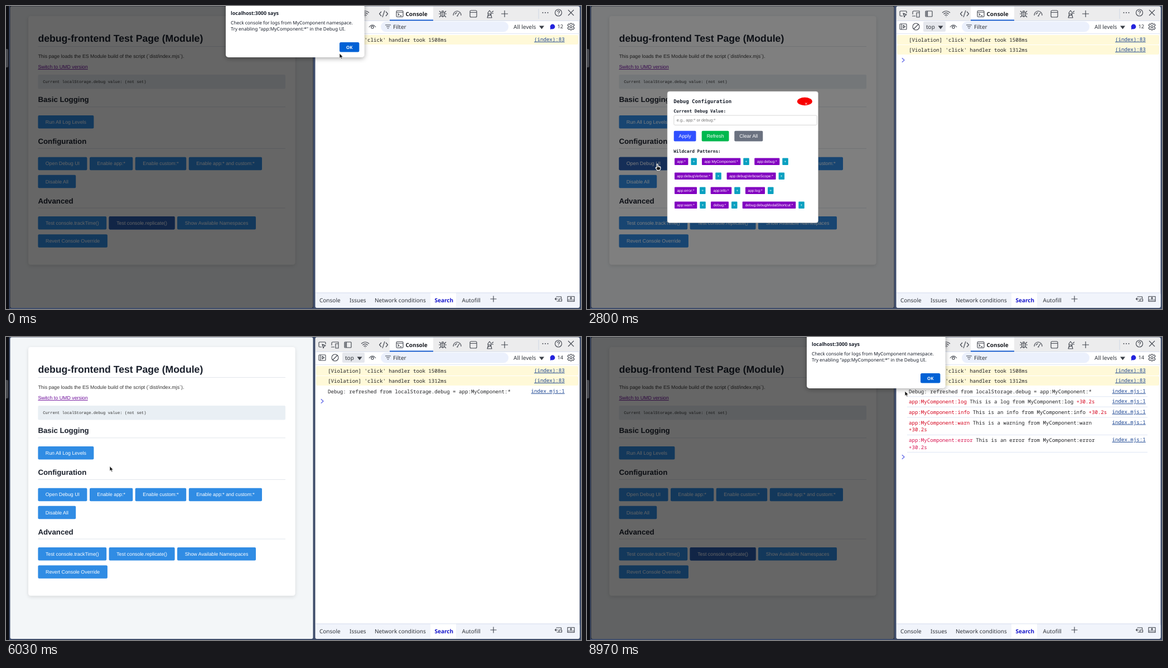
These frames come from a looping animation (1031x543 px, 9010 ms). An HTML page:

```html
<!DOCTYPE html>
<html lang="en">
<head>
<meta charset="utf-8">
<title>Debug console demo</title>
<style>
html, body { margin: 0; width: 100%; height: 100%; overflow: hidden; background: #3f4d6b; }
svg { display: block; width: 1031px; height: 543px; }
text { white-space: pre; text-rendering: geometricPrecision; }
.sans { font-family: "Liberation Sans", Arial, sans-serif; }
.ui { font-family: "Noto Sans", "Open Sans", sans-serif; }
.log { font-family: "Noto Sans Mono", monospace; }
.mono { font-family: "Liberation Mono", monospace; }
.dmono { font-family: "DejaVu Sans Mono", monospace; }
.b { font-weight: bold; }
.semi { font-weight: 600; }
.mid { text-anchor: middle; }
.end { text-anchor: end; }
.link { text-decoration: underline; }
.icon { fill: none; stroke: #434750; stroke-width: 1.15; stroke-linejoin: round; }
</style>
</head>
<body>
<svg id="stage" viewBox="0 0 1031 543" xmlns="http://www.w3.org/2000/svg"></svg>
<script>
const LOOP = 9010;
const INK = '#1a202c', BLUE = '#308ce4', DARK = '#2a5caf';

const rect = (x, y, w, h, fill, r = 0, attrs = '') =>
  `<rect x="${x}" y="${y}" width="${w}" height="${h}" rx="${r}" fill="${fill}" ${attrs}/>`;
const text = (x, y, s, size, cls, fill = INK) =>
  `<text x="${x}" y="${y}" font-size="${size}" class="${cls}" fill="${fill}">${s}</text>`;
const group = (id, body) => `<g id="${id}">${body}</g>`;
const icon = (x, y, d) => `<path class="icon" transform="translate(${x} ${y})" d="${d}"/>`;
const triangle = (x, y) => `<path d="M${x} ${y}h9l-4.5 6z" fill="#3c4048"/>`;

// Web page

function pageButton(x, y, w, label, hoverId) {
  return rect(x, y, w, 23.5, BLUE, 2) +
    (hoverId ? rect(x, y, w, 23.5, DARK, 2, `id="${hoverId}"`) : '') +
    text(x + w / 2, y + 14.7, label, 8.83, 'sans mid', '#fff');
}

const heading = (y, s) => text(57.4, y, s, 13.25, 'sans b') + rect(57.4, y + 8, 443.6, 1, '#e2e6ec');

const page = rect(7.5, .5, 543, 540.5, '#f3f6f8', 3) +
  rect(40, 18, 478.5, 445.5, '#fff', 4.5, 'filter="url(#soft)"') +
  text(57.4, 64, 'debug-frontend Test Page (Module)', 17.66, 'sans b') +
  rect(57.4, 72, 443.6, 1, '#e2e6ec') +
  text(57.4, 93, 'This page loads the ES Module build of the script (`dist/index.mjs`).', 8.83, 'sans', '#333') +
  text(57.4, 112, 'Switch to UMD version', 8.83, 'sans link', '#6c0a9a') +
  rect(57.4, 123, 443.6, 25.5, '#e9eff4', 2) +
  text(66.2, 138.4, 'Current localStorage.debug value: (not set)', 7.2, 'mono', '#333') +
  heading(172.3, 'Basic Logging') +
  pageButton(57.4, 196, 100, 'Run All Log Levels') +
  heading(247, 'Configuration') +
  pageButton(57.4, 270.7, 88, 'Open Debug UI', 'openHover') +
  pageButton(150, 270.7, 77.3, 'Enable app:*') +
  pageButton(231.7, 270.7, 91.5, 'Enable custom:*') +
  pageButton(327.8, 270.7, 131.2, 'Enable app:* and custom:*') +
  pageButton(57.4, 302.8, 67.8, 'Disable All') +
  heading(353.5, 'Advanced') +
  pageButton(57.4, 377, 122.8, 'Test console.trackTime()') +
  pageButton(184.6, 377, 118, 'Test console.replicate()', 'replicateHover') +
  pageButton(307, 377, 141, 'Show Available Namespaces') +
  pageButton(57.4, 409.2, 124.5, 'Revert Console Override');

// Debug modal

const chips = [
  [157, 24.4, 'app:*'], [206, 69.3, 'app:MyComponent:*'], [300.3, 45, 'app:debug:*'],
  [157, 68.3, 'app:debugVerbose:*'], [250.6, 88, 'app:debugVerboseScope:*'],
  [157, 40, 'app:error:*'], [221.7, 37.5, 'app:info:*'], [284, 35, 'app:log:*'],
  [157, 40.3, 'app:warn:*'], [222, 32, 'debug:*'], [278.7, 95.6, 'debug:debugModalShortcut:*']
];

function drawChips() {
  let y = 246.5;
  return chips.map(([x, w, label]) => {
    if (x === 157) y += 26;
    return rect(x, y, w, 12.6, '#8200c0', 1) +
      text(x + w / 2, y + 8.7, label, 6.62, 'sans mid', '#fff') +
      rect(x + w + 5, y, 10.5, 12.6, '#08a0c0', 1) +
      text(x + w + 10.2, y + 8.5, '+', 6.62, 'sans mid', '#fff');
  }).join('');
}

const modalButton = (x, w, label, fill) =>
  rect(x, 223.7, w, 18.8, fill, 2) + text(x + w / 2, 236.2, label, 8.83, 'sans mid', '#fff');

const modal = rect(144, 153, 270.5, 235.5, '#fff', 4, 'stroke="#bbb" stroke-width=".6"') +
  text(155.3, 173.7, 'Debug Configuration', 9.09, 'dmono b') +
  '<ellipse cx="390.4" cy="171" rx="13.5" ry="7.2" fill="#f80000"/>' +
  text(392.8, 178.3, '×', 8.8, 'sans mid', '#fff') +
  text(155.3, 191.2, 'Current Debug Value:', 7.8, 'dmono b') +
  rect(155.8, 196, 256.4, 17.4, '#fff', 2, 'stroke="#ccc" stroke-width=".8"') +
  group('placeholder', text(160.8, 207.4, 'e.g., app:* or debug:*', 7.36, 'sans', '#757575')) +
  group('value', text(160.8, 207.4, 'app:MyComponent:*', 7.36, 'sans', '#111')) +
  modalButton(155.7, 39.8, 'Apply', '#3050ff') +
  modalButton(205.7, 48.8, 'Refresh', '#00b84e') +
  modalButton(264.3, 51, 'Clear All', '#6b7280') +
  text(155.3, 262.8, 'Wildcard Patterns:', 7.8, 'dmono b') +
  drawChips();

// Developer tools

const LOG = 9.12, LINK = '#174291';
const logText = (x, y, s, fill = '#202124') => text(x, y, s, LOG, 'log', fill);
const logLink = (y, s) => text(1001.7, y, s, LOG, 'log end link', LINK);
const violation = (y, ms) => rect(556, y - 12, 470, 17, '#fff9d8', 3) +
  logText(577, y, `[Violation] 'click' handler took ${ms}ms`) + logLink(y - 1, '(index):83');

function replicateLog(y, level, message, color, wraps) {
  const time = `<tspan fill="${color}"${wraps ? ' x="577" dy="12.7"' : ''}>${wraps ? '' : ' '}+30.2s</tspan>`;
  return rect(574, y - 13, 431, 1, '#dfe6f5') +
    logText(577, y, `<tspan fill="${color}">app:MyComponent:${level}</tspan> This is ${message} from MyComponent:${level}${time}`) +
    logLink(y - 1, 'index.mjs:1');
}

const toolIcons = [
  [567, 14, 'M-1 4H-4.5Q-6 4-6 2.5V-4Q-6-5-4.5-5H4.5Q6-5 6-4V-1M0-1L6 1.6 3.4 2.8 2 6Z'],
  [590, 14, 'M-6 1V-3Q-6-5-4-5H6V-2M-7 4H-1M1-2H6V6H1Z'],
  [613, 14, 'M-5-5H5Q6-5 6-4V4Q6 5 5 5H-5Q-6 5-6 4V-4Q-6-5-5-5M-2.5-5V5M-4.3-4V4'],
  [644, 14, 'M-7-2Q0-8 7-2M-4.7.6Q0-4 4.7.6M-2.4 3Q0 .8 2.4 3M-.5 5H.5'],
  [677, 14, 'M-4-4L-7.5 0-4 4M4-4L7.5 0 4 4M2-6L-2 6'],
  [706, 14, 'M-4.5-5.5H4.5Q6-5.5 6-4V4Q6 5.5 4.5 5.5H-4.5Q-6 5.5-6 4V-4Q-6-5.5-4.5-5.5M-6-2.8H6M-3.5-.8L-1.2 1.2-3.5 3.2M0 3.4H3.4'],
  [783, 14, 'M-3-2Q0-5 3-2V3Q0 8 -3 3ZM-2-4Q0-7 2-4M-3 0H-7M3 0H7M-3-2L-6-5M3-2L6-5M-3 3L-6 6M3 3L6 6M0-3V5'],
  [809, 14, 'M-7 3Q-7-4 0-5 7-4 7 3M-4 1Q-3-2 0-2M0 4L4-2M-1 4H1.5'],
  [838, 14, 'M-4-6H4Q6-6 6-4V4Q6 6 4 6H-4Q-6 6-6 4V-4Q-6-6-4-6M-6-2.5H6'],
  [867, 14, 'M-3-2L0-6 3-2V0H-3ZM-2 0L-4 7H4L2 0M-3 4L3 1M4-3L7-5M4-1H7'],
  [894, 14, 'M-6 0H6M0-6V6'],
  [990.5, 12, 'M6 0A6 6 0 1 0-6 0 6 6 0 1 0 6 0M-2-1.5Q-1.5-3.5 0-3.5 2-3.5 2-1.5 1.5-.5 0 1M0 2.5V3.6'],
  [1013, 12, 'M-5-5L5 5M5-5L-5 5'],
  [567, 37, 'M-5-5H5Q6-5 6-4V4Q6 5 5 5H-5Q-6 5-6 4V-4Q-6-5-5-5M-3-5V5M0-2.5L3.5 0 0 2.5Z'],
  [590, 37, 'M6 0A6 6 0 1 0-6 0 6 6 0 1 0 6 0M4-4L-4 4'],
  [657, 37, 'M-6 1Q0-7 6 1M2.2 1A2.2 2.2 0 1 0-2.2 1 2.2 2.2 0 1 0 2.2 1'],
  [685, 37, 'M-5-3H5M-3 0H3M-1.3 3H1.3'],
  [1013, 37, 'M2 0A2 2 0 1 0-2 0 2 2 0 1 0 2 0M-1-6H1L2-4 4.5-5 6-2.5 4.5-1V1L6 2.5 4.5 5 2 4 1 6H-1L-2 4-4.5 5-6 2.5-4.5 1V-1L-6-2.5-4.5-5-2-4Z'],
  [874, 525, 'M-5.5 0H5.5M0-5.5V5.5'],
  [990.5, 525, 'M-4-4H5V-1M1 4H-3M-6 0H-1M-4-2L-6 0-4 2M1 0H6V4H1Z'],
  [1013, 525, 'M-6-4.5H6V4.5H-6ZM-6 2H6M0 1V-2.5M-2-.8L0-2.8 2-.8']
];

const uiText = (x, y, s, cls = '', fill = '#30343b') => text(x, y, s, 10, 'ui ' + cls, fill);

const devtools = rect(554.5, .5, 474, 540.5, '#fff', 3) +
  rect(555, 1, 473.5, 25, '#ececed', 3) + rect(555, 26, 473.5, 1, '#d8e0f0') +
  rect(688, 1, 78, 25, '#fff') + rect(688, 24.5, 78, 2, '#1a5fd0') +
  uiText(716.5, 17.7, 'Console', 'semi', '#16191f') +
  rect(954.5, 5, 1, 18, '#cdd6e6') +
  [962.5, 967, 971.5].map(x => `<circle cx="${x}" cy="12" r="1" fill="#434750"/>`).join('') +
  rect(603, 28, 40, 18, '#e5e7ec', 2) + uiText(608, 41, 'top') + triangle(629.5, 35.5) +
  rect(672, 28, 229, 18.5, '#ebf0fc', 9) + uiText(694, 41, 'Filter') +
  uiText(910, 41, 'All levels') + triangle(956, 35.5) +
  '<circle cx="980" cy="37" r="4.4" fill="#2323dc"/><path d="M976 37v5l3-1z" fill="#2323dc"/>' +
  `<text id="count" x="988.5" y="40" font-size="9.3" class="ui" fill="#30343b"></text>` +
  rect(555, 49, 473.5, 1, '#dfe6f3') +
  violation(64, 1508) +
  group('second', violation(82, 1312)) +
  group('refreshed', logText(577, 100.8, 'Debug: refreshed from localStorage.debug = app:MyComponent:*') + logLink(100, 'index.mjs:1')) +
  group('logs',
    replicateLog(119.3, 'log', 'a log', '#d4001c') +
    replicateLog(137.8, 'info', 'an info', '#d4001c') +
    replicateLog(156.6, 'warn', 'a warning', '#d4001c', true) +
    replicateLog(188, 'error', 'an error', '#d8134f', true) +
    rect(574, 206, 431, 1, '#dfe6f5')) +
  '<path id="prompt" d="M564.8-3.8L569 0l-4.2 3.8" fill="none" stroke="#5a62e6" stroke-width="1.2"/>' +
  rect(555, 514, 473.5, 26.5, '#f1f4fb', 3) + rect(555, 513.5, 473.5, 1, '#d3dcee') +
  rect(761, 514.5, 46, 26, '#fff') +
  uiText(562, 531, 'Console') + uiText(616, 531, 'Issues') + uiText(661, 531, 'Network conditions') +
  uiText(768.5, 531, 'Search', 'semi', '#1414cc') + uiText(817.5, 531, 'Autofill') +
  toolIcons.map(i => icon(...i)).join('');

const alertBox = rect(394, -8, 248.5, 100, '#fff', 5, 'filter="url(#lift)"') +
  text(403, 16, 'localhost:3000 says', 9, 'ui b') +
  text(403, 32.8, 'Check console for logs from MyComponent namespace.', 8.35, 'ui') +
  text(403, 43.5, 'Try enabling "app:MyComponent:*" in the Debug UI.', 8.35, 'ui') +
  rect(598, 65, 35.4, 17.6, '#0061d5', 2.5, 'id="ok"') +
  text(615.7, 76.6, 'OK', 7.8, 'ui b mid', '#fff');

const cursors = group('arrow', '<path d="M0 0V8.6L2 6.8 3.5 10 5 9.3 3.6 6.3H6.3Z" fill="#111" stroke="#fff" stroke-width=".7"/>') +
  group('hand', '<path d="M-1 .8Q0-.6 1 .8V4Q2.3 3.4 2.8 4.5 4 4 4.4 5 5.8 4.7 5.8 6.2V8.5Q5.5 11 3.5 11.3H0Q-1 10.5-3 7.2-2.7 5.6-1 7Z" fill="#111" stroke="#fff" stroke-width="1.2"/>' +
    '<path d="M1 4V6.5M2.8 4.5V6.8M4.4 5V7" stroke="#fff" stroke-width=".6"/>') +
  group('beam', '<path d="M-2-4.5Q0-4.5 0-3.5 0-4.5 2-4.5M0-3.5V3.5M-2 4.5Q0 4.5 0 3.5 0 4.5 2 4.5" fill="none" stroke="#222" stroke-width="1"/>');

const stage = document.getElementById('stage');
stage.innerHTML = `<defs>
  <filter id="soft" x="-5%" y="-5%" width="110%" height="110%"><feDropShadow dx="0" dy="2" stdDeviation="3" flood-opacity=".12"/></filter>
  <filter id="lift" x="-10%" y="-20%" width="120%" height="150%"><feDropShadow dx="0" dy="2" stdDeviation="4" flood-opacity=".35"/></filter>
  </defs>` +
  rect(0, 0, 1031, 543, '#3f4d6b') + rect(0, 0, 5.5, 543, '#0c0d12') + rect(-3, 77, 7, 33, '#46484e', 2) +
  page + rect(7, 0, 544, 541, '#000', 0, 'id="dim"') +
  group('modal', modal) + devtools + group('alert', alertBox) + group('cursor', cursors);

// Timeline

const $ = id => document.getElementById(id);
const show = (id, on) => $(id).setAttribute('display', on ? 'inline' : 'none');
const fade = (id, opacity) => $(id).setAttribute('opacity', opacity);
const ramp = (t, a, b) => Math.min(1, Math.max(0, (t - a) / (b - a)));
const latest = (steps, t) => steps.filter(s => s[0] <= t).pop()[1];

const path = [
  [0, 598, 85], [230, 598, 85], [630, 619, 79], [1230, 619, 79], [1600, 335, 216],
  [1870, 335, 216], [2530, 126, 283], [3370, 126, 283], [4200, 231, 275], [5100, 231, 275],
  [5130, 226, 272], [5630, 186, 231], [6730, 186, 233], [6960, 152, 272], [7230, 208, 341],
  [7630, 228, 391], [8070, 228, 391], [8600, 496, 145], [8830, 496, 145], [8970, 570, 97], [LOOP, 570, 97]
];
const pointers = [
  [0, 'arrow'], [870, 'beam'], [1290, 'arrow'], [2380, 'hand'], [2870, 'arrow'], [3970, 'hand'],
  [5200, 'arrow'], [5500, 'hand'], [6030, 'arrow'], [7520, 'hand'], [8070, 'arrow']
];
const prompts = [[0, 79], [870, 97], [6030, 115], [8070, 215]];

function pointerAt(t) {
  const i = path.findIndex(p => p[0] > t);
  const [t0, x0, y0] = path[i - 1], [t1, x1, y1] = path[i];
  const u = ramp(t, t0, t1), e = u * u * (3 - 2 * u);
  return [x0 + (x1 - x0) * e, y0 + (y1 - y0) * e];
}

function draw(t) {
  const modalOpen = t >= 2800 && t < 6030;
  const alertDim = t >= 8030 ? .6 : .6 * (1 - ramp(t, 800, 1000));
  fade('dim', modalOpen ? .5 : alertDim);
  show('modal', modalOpen);
  show('placeholder', t < 4630);
  show('value', t >= 4630);
  fade('alert', t < 4000 ? 1 - ramp(t, 800, 950) : ramp(t, 8060, 8180));
  $('ok').setAttribute('fill', t > 330 && t < 1000 ? '#1a6fda' : '#0061d5');
  fade('replicateHover', t < 4000 ? 1 - ramp(t, 1230, 1430) : ramp(t, 7520, 7700));
  fade('openHover', ramp(t, 2380, 2530) - ramp(t, 2810, 2900));
  show('second', t >= 870);
  show('refreshed', t >= 6030);
  show('logs', t >= 8070);
  $('count').textContent = t < 2850 ? '12' : '14';
  $('prompt').setAttribute('transform', `translate(0 ${latest(prompts, t)})`);
  const kind = latest(pointers, t);
  for (const id of ['arrow', 'hand', 'beam']) show(id, id === kind);
  $('cursor').setAttribute('transform', `translate(${pointerAt(t)})`);
}

const start = performance.now();
function tick() {
  draw((performance.now() - start) % LOOP);
  requestAnimationFrame(tick);
}
tick();
</script>
</body>
</html>
```
